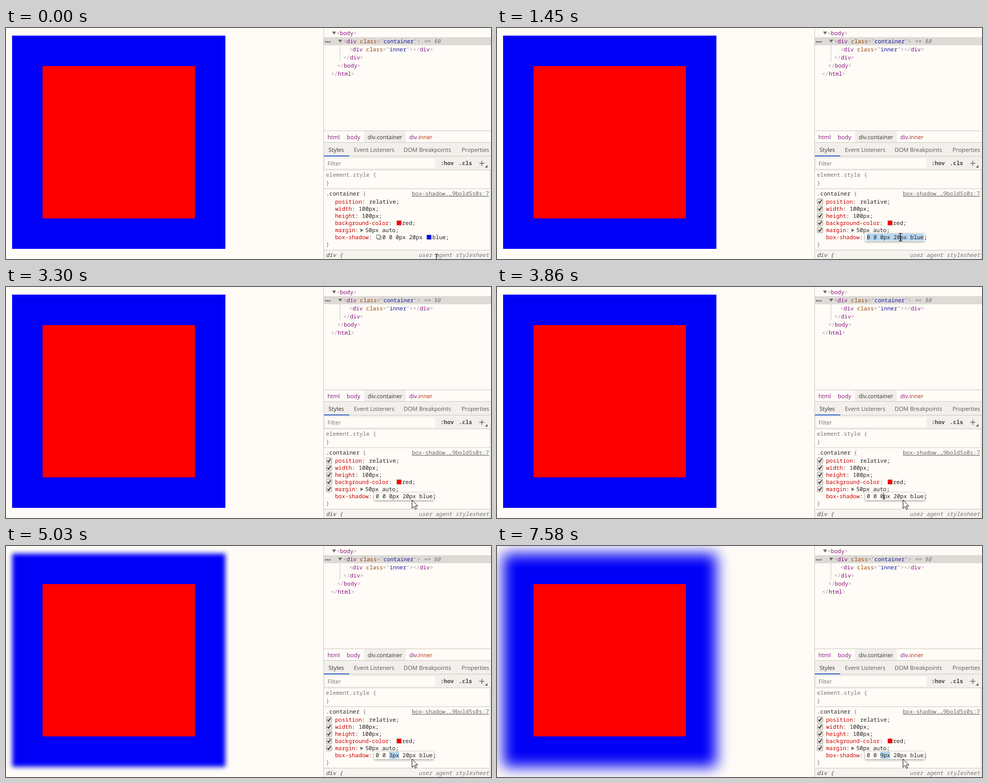
An HTML page that plays this animation: 955 px wide and 455 px high, repeating every 8000 ms.

```html
<!DOCTYPE html>
<html lang="en">
<head>
<meta charset="utf-8">
<title>Box shadow blur</title>
<style>
  html, body { margin: 0; width: 100%; height: 100%; overflow: hidden; background: #fffcf7; }
  #box { position: absolute; left: 72px; top: 75px; width: 300px; height: 300px; background: #f00; }
  svg { position: absolute; left: 0; top: 0; }
  text { white-space: pre; text-rendering: geometricPrecision; }
  .mono { font: 11px "Noto Sans Mono", "DejaVu Sans Mono", monospace; fill: #222; }
  .ui { font: 11.3px "Open Sans", "Noto Sans", sans-serif; fill: #333; }
  .ui .dim { fill: #5a5a5a; }
  .tag { fill: #881280; }
  .br { fill: #a894a6; }
  .attr { fill: #994500; }
  .val { fill: #1a1aa6; }
  .prop { fill: #c80000; }
  .grey { fill: #777; }
  .it { font-style: italic; }
  .line { stroke: #ccc9c5; fill: none; }
  .sel { fill: #b7d7f2; }
  .field { fill: #fffcf7; filter: drop-shadow(0 1px 2px rgba(0,0,0,.45)); }
</style>
</head>
<body>
<div id="box"></div>
<svg width="955" height="455" viewBox="0 0 955 455">
  <!-- panel backgrounds -->
  <path fill="#fffcf7" d="M626 0h329v455h-329z"/>
  <path fill="#dedbd7" d="M626 18h329v16h-329z"/>
  <path fill="#f0edea" d="M705 203h82v22h-82z"/>
  <path fill="#f3f0ec" d="M626 226h329v54h-329z"/>
  <path fill="#fffcf7" d="M629 257h216v19h-216z"/>
  <path fill="#f7f4f0" d="M626 438h327v17h-327z"/>
  <path class="line" d="M625.5 0v455M626 202.5h329M626 225.5h329M626 252.5h329M626 279.5h329M626 316.5h327M626 437.5h327M953.5 280v175M657.5 34v32"/>
  <path fill="#3568c4" d="M626 251h50v2h-50z"/>

  <!-- element tree -->
  <g fill="#6e6e6e">
    <path d="M642 7h8l-4 6z"/>
    <path d="M654 23h8l-4 6z"/>
    <path d="M628 26h3v2.500h-3zM632 26h3v2.500h-3zM636 26h3v2.500h-3z"/>
  </g>
  <g class="mono" id="tree"></g>

  <!-- breadcrumbs and tabs -->
  <g class="ui">
    <text x="633" y="219" class="tag">html</text>
    <text x="671" y="219" class="tag">body</text>
    <text x="712" y="219">div.container</text>
    <text x="794" y="219"><tspan class="tag">div</tspan><tspan fill="#b03010">.inner</tspan></text>
    <text x="635" y="244">Styles</text>
    <text x="685" y="244" class="dim">Event Listeners</text>
    <text x="783" y="244" class="dim">DOM Breakpoints</text>
    <text x="897" y="244" class="dim">Properties</text>
    <text x="633" y="271" fill="#757575" style="fill:#757575">Filter</text>
  </g>
  <g class="mono" font-weight="600" style="font-weight:600;fill:#444">
    <text x="855.500" y="270">:hov</text>
    <text x="891.500" y="270">.cls</text>
  </g>
  <path stroke="#6e6e6e" stroke-width="1.500" d="M932 266.500h10M937 261.500v10"/>
  <path fill="#555" d="M948 270v5h-5z"/>

  <!-- style rules -->
  <g class="mono">
    <text x="630" y="293" class="grey">element.style {</text>
    <text x="630" y="309" class="grey">}</text>
    <text x="630" y="330">.container <tspan class="grey">{</tspan></text>
    <text x="951" y="330" text-anchor="end" fill="#666" style="fill:#666;text-decoration:underline">box-shadow.…9bold5s0s:7</text>
    <g id="rules"></g>
    <path fill="#6e6e6e" d="M698 395l6 3.500l-6 3.500z"/>
    <path fill="#f00" stroke="#8a8784" stroke-width=".6" d="M769.500 379.500h9v9h-9z"/>
    <text x="630" y="430" class="grey">}</text>
    <text x="630" y="451" class="it" style="fill:#444">div {</text>
    <text x="951" y="451" text-anchor="end" class="it grey">user agent stylesheet</text>
  </g>

  <g id="checks"></g>

  <g class="mono" id="idle">
    <path fill="none" stroke="#6e6e6e" d="M731.500 409.500h7v7h-7z"/>
    <path fill="#fffcf7" stroke="#6e6e6e" d="M729.500 407.500h7v7h-7z"/>
    <text x="741" y="416">0 0 0px 20px</text>
    <path fill="#0000f7" stroke="#8a8784" stroke-width=".6" d="M828.500 407.500h9v9h-9z"/>
    <text x="839.500" y="416">blue;</text>
  </g>
  <g class="mono" id="edit">
    <path class="field" d="M725 405h117v15h-117z"/>
    <rect class="sel" id="sel" y="405" height="14"/>
    <text x="728" y="416" id="value"></text>
    <text x="840.500" y="416">;</text>
    <rect id="caret" y="405" width="1" height="14" fill="#222"/>
  </g>

  <path id="arrow" fill="#fff" stroke="#111" stroke-linejoin="round" d="M.5 .5v16.500l3.900-3.700l2.700 5.700l2.400-1.100l-2.700-5.600h5z"/>
  <path id="beam" fill="none" stroke="#111" stroke-width="1.200" d="M-3.500 -7.500h2.500l1 1l1-1h2.500M0 -6.500v13M-3.500 7.500h2.500l1-1l1 1h2.500"/>
</svg>
<script>
const LOOP = 8000, CHAR = 6.6, TEXT_X = 728;
const $ = id => document.getElementById(id);
const span = (cls, s) => `<tspan class="${cls}">${s}</tspan>`;
const text = (x, y, s) => `<text x="${x}" y="${y}">${s}</text>`;

// Static rows
const open = (name, cls) => span('br', '&lt;') + span('tag', name) +
  (cls ? ' ' + span('attr', 'class') + span('br', '="') + span('val', cls) + span('br', '"') : '') +
  span('br', '&gt;');
const close = name => span('br', '&lt;/') + span('tag', name) + span('br', '&gt;');

$('tree').innerHTML = [
  [651, open('body')],
  [664, open('div', 'container') + span('it grey', ' == $0')],
  [676, open('div', 'inner') + close('div')],
  [664, close('div')],
  [652, close('body')],
  [640, close('html')]
].map(([x, s], i) => text(x, 14 + i * 16, s)).join('');

$('rules').innerHTML = [
  ['position', 715, 'relative;'],
  ['width', 694.5, '100px;'],
  ['height', 701, '100px;'],
  ['background-color', 780, 'red;'],
  ['margin', 707.5, '50px auto;'],
  ['box-shadow', 0, '']
].map(([name, x, value], i) => {
  const y = 346 + i * 14;
  return text(648, y, span('prop', name) + ':') + text(x, y, value);
}).join('');

$('checks').innerHTML = Array.from({ length: 6 }, (_, i) =>
  `<g transform="translate(630 ${336 + i * 14})">
    <rect x=".5" y=".5" width="11" height="11" rx="1.500" fill="#e9e6e2" stroke="#a5a29e"/>
    <path d="M2.800 6l2.400 2.600l4.200-6" fill="none" stroke="#444" stroke-width="2"/>
  </g>`).join('');
const lastCheck = $('checks').lastElementChild;

// Pointer: time, x, y, shape
const pointer = [
  [0, 847, 453, 'beam'], [70, 845, 448, 'beam'], [150, 835, 436, 'beam'],
  [220, 822, 428, 'beam'], [300, 812, 422, 'beam'], [370, 806, 418, 'beam'],
  [450, 803, 415, 'beam'], [760, 802, 414, 'beam'], [820, 812, 419, 'beam'],
  [1000, 809, 419, 'arrow'], [1160, 806, 417, 'beam'], [1235, 800, 414, 'beam'],
  [1310, 796, 412, 'beam'], [1385, 794, 412, 'beam'], [1535, 806, 420, 'arrow'],
  [1610, 830, 425, 'arrow'], [1685, 855, 427, 'arrow'], [1760, 867, 427, 'arrow'],
  [2150, 850, 427, 'arrow'], [2220, 825, 427, 'arrow'], [2290, 795, 423, 'arrow'],
  [2370, 769, 417, 'beam'], [2530, 765, 410, 'beam'], [2610, 763, 407, 'beam'],
  [2850, 770, 412, 'beam'], [2930, 788, 418, 'arrow'], [3000, 799, 419, 'arrow']
];
// Caret: time, characters before it (-1 hides it)
const caret = [[0, -1], [1460, 10], [1990, -1], [2530, 10], [2780, 5], [3300, -1], [3860, 5], [4390, -1]];
// Selection: time, first character, length
const selection = [[0, 0, 17], [1460, 0, 0], [4390, 4, 3]];
// Blur value: time, px
const blur = [[0, 0], [4390, 1], [4790, 2], [5030, 3], [5330, 4], [5710, 5], [6120, 6], [6570, 7], [7040, 8], [7580, 9]];
const HOVER = 150, EDIT = 680, ZOOM = 3;

const at = (steps, t) => steps.findLast(s => s[0] <= t);
const show = (el, on) => { el.style.display = on ? '' : 'none'; };

function draw(t) {
  const editing = t >= EDIT;
  show($('checks'), t >= HOVER);
  show(lastCheck, !editing);
  show($('idle'), !editing);
  show($('edit'), editing);

  const px = at(blur, t)[1];
  $('box').style.boxShadow = `0 0 ${px * ZOOM}px ${20 * ZOOM}px #0000f7`;
  $('value').textContent = `0 0 ${px}px 20px blue`;

  const [, from, len] = at(selection, t);
  $('sel').setAttribute('x', TEXT_X + from * CHAR);
  $('sel').setAttribute('width', len * CHAR);

  const pos = at(caret, t)[1];
  show($('caret'), pos >= 0);
  $('caret').setAttribute('x', Math.round(TEXT_X + pos * CHAR));

  const [, x, y, shape] = at(pointer, t);
  for (const kind of ['arrow', 'beam']) {
    show($(kind), kind === shape);
    $(kind).setAttribute('transform', `translate(${x + (kind === 'beam' ? .5 : 0)} ${y})`);
  }
}

const start = performance.now();
function tick() {
  draw((performance.now() - start) % LOOP);
  requestAnimationFrame(tick);
}
tick();
</script>
</body>
</html>
```
